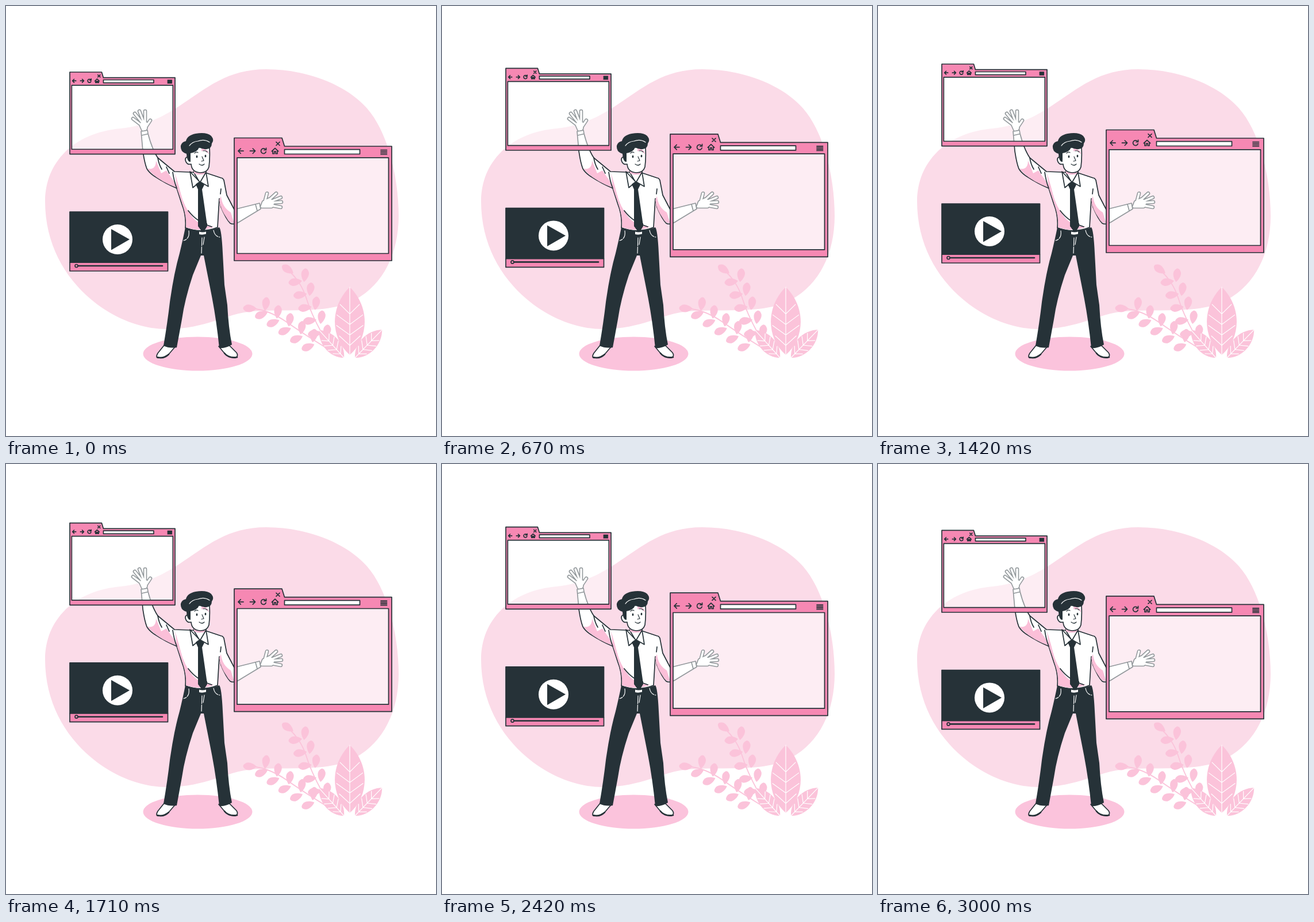
Animation, 748 px wide and 748 px high, one loop 3040 ms. Source, as an HTML page:

```html
<!DOCTYPE html>
<html lang="en">
<head>
<meta charset="utf-8">
<title>Floating windows</title>
<style>
  html, body { margin: 0; width: 100%; height: 100%; overflow: hidden; background: #fff; }
  svg { display: block; width: 100vw; height: 100vh; }
  .line { fill: none; stroke: #263238; stroke-width: 1.7; stroke-linecap: round; stroke-linejoin: round; }
  .thin { stroke-width: 1.2; }
  .bold { stroke-width: 2.6; }
  .white { fill: #fff; }
  .pink { fill: #f688b3; }
  .dark { fill: #263238; }
  .shade { fill: #fbbfd8; }
  .plant { fill: #fbc3da; }
  .vein { fill: none; stroke: #fff; stroke-width: 1.2; stroke-linecap: round; }
  .win * { vector-effect: non-scaling-stroke; }
  .hand path { stroke-linecap: round; stroke-linejoin: round; }
</style>
</head>
<body>
<svg viewBox="0 0 748 748">
  <defs>
    <g id="window" class="win">
      <path d="M5 34.3H268.5V201H5Z" fill="#fff" fill-opacity=".5"/>
      <path class="line pink" fill-rule="evenodd" stroke-linejoin="miter"
        d="M0 0H83L87.5 14.5H274V213.5H0ZM5 34.3V201H268.5V34.3Z"/>
      <path class="line" d="M73 7.2L79 13M79 7.2L73 13
        M16 22.7H7M11.2 18.5L7 22.7L11.2 27M27.5 22.7H36.5M32.3 18.5L36.5 22.7L32.3 27
        M55.2 24A4.4 4.4 0 1 1 53.8 19.4M55.6 17.5V21H52
        M65.3 23.2L71 17.8L76.7 23.2M67 22.3V27.5H69.7V23.7H72.3V27.5H75V22.3"/>
      <path class="line" stroke-dasharray="none" d="M255 21H265.5m0 2.5h-10.500m0 2.500h10.500m0 2.500h-10.500"/>
      <path class="line white" d="M87.5 20.2H218.5V28H87.5Z"/>
    </g>
  </defs>

  <path fill="#fbdbe8" d="M453 110C520 110 590 135 628 178C665 220 683 300 683 365C683 445 643 507 575 523
    C530 533 480 527 430 531C380 535 350 562 278 562C188 562 68 478 68 340C68 270 120 220 200 213
    C245 208 275 191 300 175C350 142 385 110 453 110Z"/>
  <ellipse cx="333.5" cy="605" rx="95" ry="29.5" fill="#fbc3dc"/>
  <path fill="none" stroke="#fbc3da" stroke-width="1.8"
    d="M424 526Q456 527 490 551T584 611M489 458Q513 478 523 510T558 584"/>
  <g id="plants"></g>

  <g id="man">
    <path class="line white" d="M276 589L264 604Q260 611 264 612Q276 614 282 607L294 593Z"/>
    <path class="line white" d="M370 592L380 604Q386 612 399 612Q405 609 401 603L387 589Z"/>
    <path class="line bold" d="M263 611Q273 614 283 606M380 604Q387 613 402 611"/>

    <path class="line white" d="M320 289L293 288L264 264Q254 249 247 222L246 216L235 218
      L238 252Q241 273 245 283Q249 290 258 296Q278 309 297 317L306 345Q314 365 312 386
      Q340 396 368 385L371 335L374 350Q383 371 390 378Q397 382 410 373L443 353L441 343L397 354
      L384 329L379 303Q377 299 374 299L350 291Z"/>
    <path class="shade" d="M246 283Q261 286 261 269L270 291L279 286L297 312V316Q262 303 246 283Z"/>
    <path class="shade" d="M294 291Q300 310 304 326Q309 348 325 368Q338 383 362 384Q340 394 313 385Q315 369 307 345L297 316Z"/>
    <path class="shade" d="M374 331Q376 350 391 359L397 378Q389 379 384 369Q372 352 371 337Z"/>
    <path class="line" d="M264 264Q266 276 271 284M279 280L284 291M290 289Q292 304 297 317M374 318L373 327
      M317 356Q332 376 358 384M236 225L247 222.5M434 345L437 356"/>
    <g id="hands"></g>

    <path class="line white" d="M327 277V290L337 307L348 295V280Z"/>
    <path class="shade" d="M327 284Q336 292 348 286V291Q337 296 327 291Z"/>
    <path class="line white" d="M320 288L325 316L337 306ZM348 289L352 314L338 306Z"/>
    <path class="line white" d="M319 246V263Q312 261 312 268Q314 277 322 275Q323 289 338 290Q350 290 353 280Q355 266 354 246Z"/>
    <path class="shade" d="M340 248Q353 249 353 258Q347 249 340 253Z"/>
    <path class="dark" d="M321 256V271Q315 272 314 257Q303 254 304 243Q306 236 313 235
      Q315 225 330 222Q349 219 357 226Q363 233 358 239Q358 248 349 249Q343 250 336 246Q333 254 321 256Z"/>
    <path class="vein" d="M319 243Q324 236 334 235Q345 231 354 237"/>
    <path class="line thin" d="M328 256Q331 253 334 255M343 252Q347 251 350 254M341 262L344 269L340 270M336 275Q341 279 345 275"/>
    <ellipse class="dark" cx="332" cy="262" rx="1.4" ry="2.2"/>
    <ellipse class="dark" cx="347" cy="261" rx="1.4" ry="2.2"/>

    <path class="dark" d="M330 310L337 305L345 311L341 319L350 382L343 395L334 383V319Z"/>
    <path class="dark" d="M312 385Q340 396 371 385Q375 389 377 430L380 485L385 520Q387 560 393 589
      Q382 596 371 595Q366 545 357 500L344 434H339L325 468Q311 510 306 545L297 594Q284 596 274 591
      Q281 550 285 515Q292 465 302 430Q308 405 312 385Z"/>
    <path class="dark" d="M334 378H350V383L343 394L335 384Z"/>
    <path class="white" d="M336 392.5Q342 394.5 348 392.5V396.5Q342 398.5 336 397Z"/>
    <path class="vein" d="M318 391Q320 405 309 408M361 390Q363 401 372 402M345 402L343 415M341 403L340 430" stroke-dasharray="14 2"/>
  </g>

  <g id="floating">
    <use href="#window" transform="translate(111 115) scale(.668)"/>
    <use href="#window" x="397" y="229.5"/>
    <path class="line pink" d="M111 446H281.5V461H111Z"/>
    <path class="line dark" d="M111 358.2H281.5V446H111Z"/>
    <circle class="white" cx="194" cy="406" r="26"/>
    <path class="dark" d="M183 388L215 406L183 424.500Z"/>
    <path class="line bold" d="M125 452H272"/>
    <circle class="line pink" cx="122.5" cy="452" r="2.5"/>
  </g>
</svg>
<script>
  const LOOP = 3040, RISE = 15;
  const byId = id => document.getElementById(id);
  const place = (x, y, turn) => `transform="translate(${x} ${y}) rotate(${turn})"`;

  const leaflet = (x, y, turn) =>
    `<path class="plant" d="M0 12C-5 7 -8 -1 -6 -6Q0 -17 6 -6C8 -1 5 7 0 12Z" ${place(x, y, turn)}/>`;

  // Evenly spaced leaflets down one side of a stem.
  const row = (x, y, dx, dy, turn) =>
    Array.from({ length: 5 }, (_, i) => leaflet(x + dx * i, y + dy * i, turn)).join("");

  // Broad leaf with paired veins, growing up from its base.
  function leaf(x, y, turn, length, half) {
    const bulge = half * 1.33;
    let veins = `M0 0V${-length}`;
    for (let k = 0.14; k < 0.7; k += 0.155) {
      const side = half * 0.9 * Math.sin(Math.PI * (k + 0.14));
      veins += `M${-side} ${-length * (k + 0.14)}L0 ${-length * k}L${side} ${-length * (k + 0.14)}`;
    }
    return `<g ${place(x, y, turn)}>
      <path class="plant" d="M0 0C${-bulge} ${-length * 0.25} ${-bulge} ${-length * 0.72} 0 ${-length}
        C${bulge} ${-length * 0.72} ${bulge} ${-length * 0.25} 0 0Z"/>
      <path class="vein" d="${veins}"/></g>`;
  }

  // Fingers and palm as round strokes: a dark pass, then a thinner white one.
  const hand = d => `<g class="hand">
    <path d="${d}" fill="#263238" stroke="#263238" stroke-width="6.6"/>
    <path d="${d}" fill="#fff" stroke="#fff" stroke-width="3.4"/></g>`;

  byId("plants").innerHTML =
    leaflet(424, 526, -88) + row(452, 518, 20.8, 13.8, 8) + row(444, 537, 20.3, 14, -112) +
    leaflet(490, 458, -55) + row(520, 468, 9.6, 24.4, 8) + row(503, 480, 8.4, 22.5, -98) +
    leaf(598, 607, 0, 118, 26) + leaf(588, 612, -42, 65, 13.5) + leaf(607, 612, 44, 68, 14);

  byId("hands").innerHTML =
    hand("M238 215L234 206L240 201L245 205L243 214ZM234 206L221 196M237 203L224 187M239 201L232 183M242 203V183M243 211L251 199") +
    hand("M445 349L448 341L458 336L465 342L462 349ZM450 341L454 326M459 336L470 326M463 339L478 333M464 342L479 341M462 347L478 350");

  function draw(now) {
    const phase = ((now + 40) % LOOP) / LOOP;
    const lift = 1 - Math.abs(1 - 2 * phase);
    byId("floating").setAttribute("transform", `translate(0 ${0.4 - RISE * lift})`);
    requestAnimationFrame(draw);
  }
  requestAnimationFrame(draw);
</script>
</body>
</html>
```
